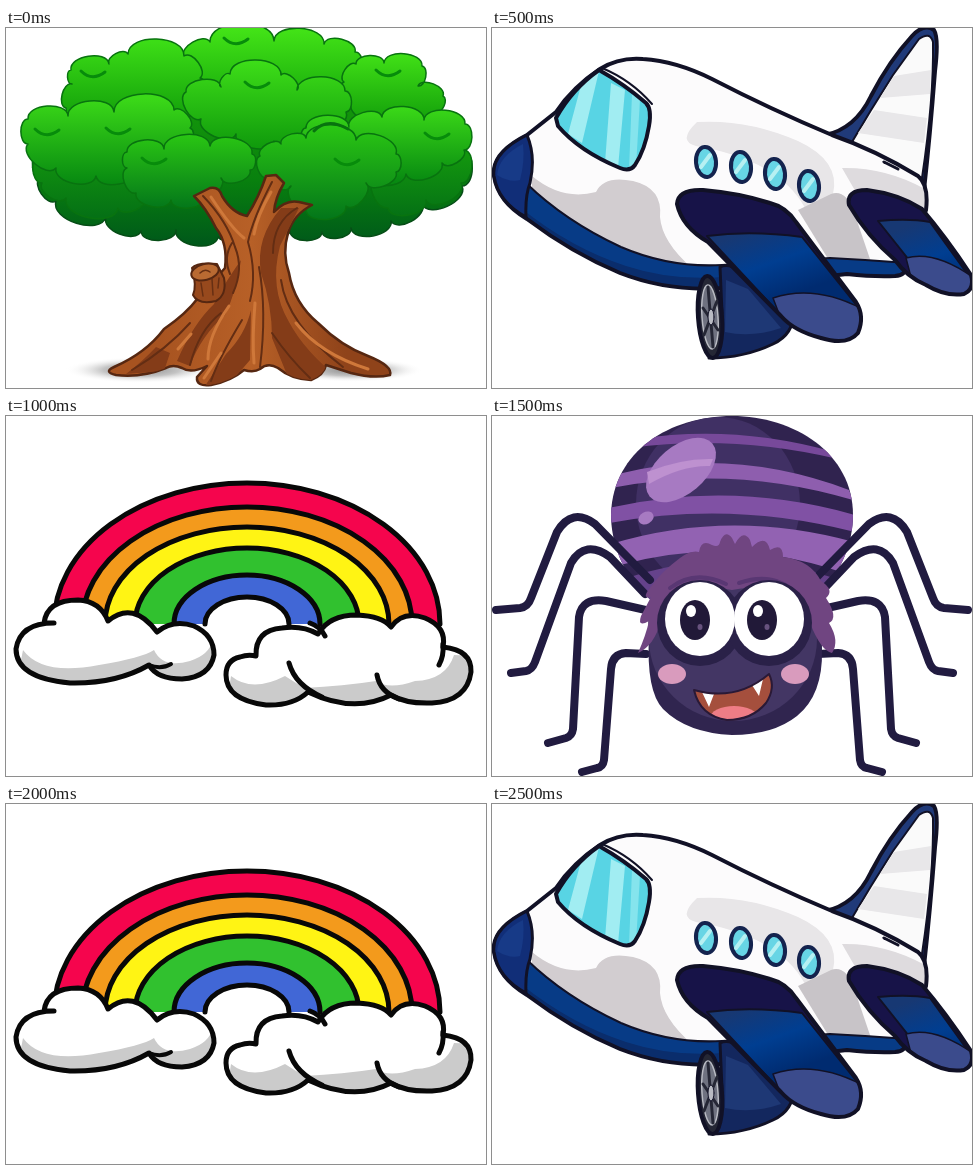
Animation, 480 px wide and 360 px high, one loop 3000 ms. Source, as an HTML page with a canvas:

```html
<!DOCTYPE html>
<html lang="en">
<head>
<meta charset="utf-8">
<title>Tree, plane, rainbow, spider</title>
<style>
html, body { margin: 0; width: 100%; height: 100%; overflow: hidden; background: #fff; }
canvas { display: block; width: 480px; height: 360px; }
</style>
</head>
<body>
<canvas id="stage" width="480" height="360"></canvas>
<script>
const ctx = document.getElementById('stage').getContext('2d');
ctx.lineCap = ctx.lineJoin = 'round';

function paint(path, fill, stroke, width = 3) {
  if (fill) { ctx.fillStyle = fill; ctx.fill(path); }
  if (stroke) { ctx.strokeStyle = stroke; ctx.lineWidth = width; ctx.stroke(path); }
}

const shape = (d, fill, stroke, width) => paint(new Path2D(d), fill, stroke, width);

function oval(x, y, rx, ry, fill, stroke, width, turn = 0) {
  const path = new Path2D();
  path.ellipse(x, y, rx, ry, turn, 0, Math.PI * 2);
  paint(path, fill, stroke, width);
}

function gradient(x0, y0, x1, y1, ...colors) {
  const g = ctx.createLinearGradient(x0, y0, x1, y1);
  colors.forEach((c, i) => g.addColorStop(i / (colors.length - 1), c));
  return g;
}

function clipped(d, draw) {
  ctx.save();
  ctx.clip(new Path2D(d));
  draw();
  ctx.restore();
}

// Closed outline of round puffs between clockwise points.
function puffs(points, fill, stroke, bulge = 0.38) {
  const path = new Path2D();
  path.moveTo(points[0], points[1]);
  for (let i = 0; i < points.length; i += 2) {
    const x = points[i], y = points[i + 1];
    const u = points[(i + 2) % points.length], v = points[(i + 3) % points.length];
    const nx = (v - y) * bulge, ny = (x - u) * bulge;
    path.bezierCurveTo(x + nx, y + ny, u + nx, v + ny, u, v);
  }
  paint(path, fill, stroke, 1.5);
}

function groundShadow(x, y, rx, ry) {
  ctx.save();
  ctx.translate(x, y);
  ctx.scale(rx, ry);
  const g = ctx.createRadialGradient(0, 0, 0, 0, 0, 1);
  g.addColorStop(0, '#8a8a8a');
  g.addColorStop(0.5, '#c4c4c4');
  g.addColorStop(1, '#ffffff00');
  oval(0, 0, 1, 1, g);
  ctx.restore();
}

function leaves(points, light, dark) {
  const ys = points.filter((_, i) => i % 2);
  const top = Math.min(...ys) - 12, bottom = Math.max(...ys) + 8;
  puffs(points, gradient(0, top, 0, bottom, light, dark), '#08730f');
}

function tree() {
  groundShadow(135, 342, 76, 13);
  groundShadow(345, 342, 72, 12);
  puffs([36,120, 60,108, 240,90, 420,108, 456,122, 456,158, 416,176, 385,193, 345,200, 316,204,
    284,203, 240,190, 212,209, 170,202, 135,203, 100,189, 50,173, 34,150],
    gradient(0, 90, 0, 215, '#12930b', '#08800e', '#00591a'), '#064d16');
  leaves([178,50, 178,29, 204,14, 268,13, 318,16, 349,24, 350,50, 300,66, 240,70, 180,66], '#43e317', '#15a80b');
  leaves([60,80, 66,56, 65,42, 103,36, 122,26, 178,28, 194,50, 190,75, 130,85], '#3cdd16', '#119d0a');
  leaves([338,54, 350,36, 378,35, 416,38, 412,58, 437,68, 430,84, 390,88, 345,75], '#43e317', '#119d0a');
  leaves([35,124, 110,114, 150,140, 140,168, 112,180, 60,170, 36,155], '#17a20c', '#057115');
  leaves([380,120, 458,122, 455,155, 420,172, 382,180], '#17a20c', '#057115');
  leaves([22,116, 22,91, 62,88, 108,84, 168,82, 184,100, 176,122, 132,140, 90,148, 50,140], '#3bd918', '#078911');
  leaves([180,64, 215,59, 224,46, 275,47, 291,62, 339,63, 340,84, 300,99, 268,113, 230,106, 195,91], '#3ddd18', '#0f990c');
  leaves([300,118, 300,100, 343,99, 376,89, 418,92, 459,96, 458,122, 436,135, 400,146, 350,140], '#3cdb18', '#078911');
  leaves([121,140, 121,124, 158,121, 204,118, 246,126, 244,142, 215,150, 200,168, 165,172, 130,165], '#2ac713', '#04771a');
  leaves([254,128, 275,116, 300,110, 350,112, 390,126, 390,144, 360,155, 340,178, 300,182, 285,158, 262,150], '#2ac713', '#04771a');
  const curl = 'q11 11 24 1';
  shape([[218,10], [75,43], [370,42], [29,101], [239,54], [136,130], [419,105], [329,131], [100,100]]
    .map(([x, y]) => `M${x} ${y}${curl}`).join(''), null, '#078c0b', 3);
  shape('M308 103Q321 89 342 101', null, '#08730f', 3);
  trunk();
}

function trunk() {
  const bark = `M188 168L204 160Q213 158 216 168Q226 185 241 188Q253 169 260 148L270 147L278 155Q269 170 268 184
    Q280 171 293 174L306 177Q288 186 282 205Q276 225 283 245Q288 275 312 295Q335 318 362 328Q387 338 384 347
    Q368 351 345 345L320 337Q318 347 305 352Q285 351 272 340Q262 334 254 341Q248 345 238 342Q225 353 205 357
    Q190 359 191 349L201 338Q185 346 176 340Q167 336 160 340Q135 350 110 347Q97 344 108 339Q140 325 158 301
    Q180 286 192 270L219 240Q222 215 210 200Q200 180 188 168Z`;
  shape(bark, gradient(150, 0, 340, 0, '#a75320', '#b76027', '#8f431a'), '#562711', 2.5);
  clipped(bark, () => {
    shape(`M275 180Q249 210 255 245Q266 277 266 310L284 354L335 352Q299 324 283 294Q263 260 274 218L293 180Z
      M235 232Q216 259 208 276Q187 296 171 333L184 338Q195 308 219 287Q231 262 235 232Z
      M245 282Q239 307 220 326L199 358L226 353L244 332Z M150 319Q137 333 120 346L158 343L164 325Z`, '#843c18');
    shape(`M197 168Q221 193 229 219Q238 241 227 265M266 154Q247 190 242 214Q251 245 244 273M291 180Q267 194 267 225
      M253 239Q261 283 254 339M215 285Q193 302 184 337M275 252Q281 296 337 339M184 295Q161 321 126 342
      M236 292Q213 330 205 353M266 305Q283 330 304 350M226 215Q217 229 224 246`, null, '#632d13', 2);
    shape(`M205 169Q226 201 238 210M265 164Q251 188 248 206M249 275Q246 310 248 335M223 278Q202 308 202 331
      M290 295Q314 326 362 341M185 306L172 321M215 325L198 350`, null, '#cf783a', 3);
  });
  shape('M186 240Q191 234 211 236L218 250Q221 267 210 273Q192 277 187 267Q191 258 186 240Z', '#97491d', '#562711', 2);
  oval(199, 244, 14, 8, '#b96a32', '#562711', 2, -0.25);
  shape('M194 245q5 -5 10 -1M195 255l2 13M206 251l1 16M213 250l-1 10', null, '#672f13', 1.5);
}

const INK = '#111126';

function plane() {
  shape('M333 107Q363 101 379 68Q397 33 420 8Q432 -5 442 2Q447 10 443 43Q438 108 432 162L360 133Z', '#203a79', INK, 4);
  shape('M357 119Q378 83 401 47L427 11Q438 3 441 14Q442 70 430 150Z', '#fafafa', INK, 2);
  shape('M402 48L439 42L438 66L388 70ZM382 82L435 90L432 115L366 105Z', '#e8e7e9');

  const body = `M2 148Q-1 125 35 107L64 84Q81 59 108 41Q127 29 151 31Q184 33 220 51Q278 81 340 107Q383 122 426 148
    Q437 157 434 182L412 239Q415 247 403 248Q382 249 355 246L230 260Q177 264 128 245Q80 225 35 191Q6 174 2 148Z`;
  shape(body, '#fcfbfc');
  clipped(body, () => {
    shape('M40 148Q70 173 104 164Q112 147 141 153Q171 160 168 189Q170 214 200 240Q131 226 40 176Z', '#d2cdd0');
    shape('M205 94Q256 91 306 113Q349 133 341 166L313 180Q287 132 204 118Q185 113 205 94Z', '#e8e6e8');
    shape('M306 182L339 166Q354 161 362 184L379 234H338Z', '#c8c4c8');
    shape('M350 140Q393 139 433 161L433 183L365 166Z', '#dedbde');
    shape('M34 155Q73 193 129 219Q178 240 230 237L338 230Q378 232 416 235V252H330L220 268Q112 255 24 190Z', '#073b86', INK, 2);
    shape('M30 181Q79 220 134 238Q180 253 230 249V270H100L25 205Z', '#0a2d6c');
  });
  shape(body, null, INK, 4);
  shape('M2 148Q-1 125 35 107Q44 128 38 155Q33 168 34 189Q6 174 2 148Z', '#112e78', INK, 3);
  shape('M5 147Q7 128 31 116Q33 133 28 152Q18 155 5 147Z', '#173a87');
  shape('M392 134L406 141', null, INK, 3);

  const glass = 'M64 90Q80 61 107 42Q132 56 154 75Q160 81 157 98Q153 122 143 137Q138 144 128 140Q87 123 66 98Z';
  shape(glass, '#58d4e4');
  clipped(glass, () => {
    shape('M91 50L107 43L90 115L76 106ZM119 55L133 62L126 140L113 135Z', '#a1edf2');
    shape('M140 66L148 71L144 139L137 142Z', '#85e4ed');
  });
  shape(glass, null, INK, 4);
  shape('M110 40Q139 52 160 76', null, INK, 2);
  for (const [x, y] of [[214,134], [249,139], [283,146], [317,158]]) {
    oval(x, y, 10, 15, '#67d5e5', '#14234e', 4, -0.1);
    shape(`M${x - 5} ${y + 5}L${x + 4} ${y - 7}`, null, '#b6f0f2', 4);
  }

  shape('M228 239Q242 232 262 258L301 285Q302 306 281 316Q252 330 217 330L230 285Z', '#13275e', INK, 3);
  shape('M234 252L256 261L289 300Q260 310 233 304Z', '#1e3875');
  oval(218, 289, 12, 41, '#252735', INK, 4, -0.07);
  oval(218, 289, 8, 32, '#6f7280', '#b9bbc3', 1.5, -0.07);
  shape('M216 259L221 319M211 280L226 302M225 273L212 307', null, '#252735', 3);
  oval(219, 289, 3, 8, '#b9bbc3', INK, 1);

  wing(`M185 176Q186 161 211 162Q247 165 278 175Q294 179 304 194L364 274Q373 288 366 305Q355 318 329 310
    Q302 303 289 288L216 214Q190 199 185 176Z`,
    'M215 208Q259 202 310 209L366 279V310H310Z', 'M281 270Q324 256 372 282V320H300Z', 280);
  wing(`M357 177Q354 162 375 162Q407 166 430 181Q454 209 479 247Q483 261 472 266Q454 269 434 257
    Q415 249 403 232Q375 208 357 177Z`,
    'M386 193Q417 190 438 194L479 251L448 271Z', 'M414 230Q443 222 482 250V280H427Z', 425);
}

function wing(outline, panel, tip, x) {
  shape(outline, '#171348');
  clipped(outline, () => {
    shape(panel, gradient(x, 195, x + 25, 265, '#173873', '#003e91', '#002b70'), INK, 2);
    shape(tip, '#3b4b8c', INK, 1.5);
  });
  shape(outline, null, INK, 4);
}

function rainbow() {
  const bands = [[193,141,'#f5054d'], [165,117,'#f39a1c'], [142,97,'#fff414'],
    [112,76,'#31c12f'], [73,49,'#4167d6'], [42,27,'#fff']];
  for (const [rx, ry, color] of bands) {
    const arch = new Path2D();
    arch.ellipse(241, 208, rx, ry, 0, Math.PI, Math.PI * 2);
    paint(arch, color, '#080808', 5);
  }
  cloud(`M48 207L38 207Q41 184 72 184Q94 185 102 205Q127 184 151 216Q167 203 188 210Q208 219 208 239
    Q204 261 176 263Q151 263 143 249Q110 268 64 267Q10 262 10 233Q14 207 48 207Z`,
    'M17 234Q36 260 93 249Q136 242 148 234Q157 253 184 245Q203 239 207 224V270H10Z');
  shape('M143 249Q155 254 165 248', null, '#080808', 4);
  cloud(`M234 241Q242 238 250 240Q249 214 276 212Q296 209 312 218Q323 199 351 199Q376 200 385 211
    Q397 194 419 202Q441 211 437 231Q466 234 465 256Q461 285 426 287Q400 288 385 279Q348 298 302 276
    Q287 290 260 289Q220 284 220 259Q220 244 234 241Z`,
    `M225 260Q246 277 279 260L298 272Q338 270 370 265Q383 274 409 265Q440 264 448 239L470 240V294H220Z`);
  shape('M283 247Q289 269 316 281M371 259Q374 276 393 283M437 228Q438 240 433 249M304 207Q315 211 319 220',
    null, '#080808', 5);
}

function cloud(outline, shade) {
  shape(outline, '#fff');
  clipped(outline, () => shape(shade, '#cbcbcb'));
  shape(outline, null, '#080808', 5);
}

function legs() {
  shape(`M158 164L103 108Q80 91 65 116L39 182Q36 191 28 192L4 194
    M153 178L118 141Q93 123 79 147L43 246Q40 254 34 255L19 257
    M158 195L114 185Q90 181 87 201L81 313Q80 320 74 322L56 327
    M154 238L134 237Q120 238 119 253L112 344Q111 351 105 352L90 356`, null, '#211b40', 8);
}

function spider() {
  const abdomen = 'M119 98C121 35 178 0 240 0C302 0 361 37 361 99C361 154 316 212 240 212C165 212 119 157 119 98Z';
  shape(abdomen, '#30234f');
  clipped(abdomen, () => {
    oval(226, 88, 82, 87, '#403064');
    shape('M145 23Q240 8 339 35L346 43Q240 18 138 32Z', '#77499a');
    shape('M126 58Q240 30 357 74L361 84Q240 48 119 72Z', '#8e5eae');
    shape('M117 92Q240 64 363 99V116Q240 84 117 107Z', '#8051a4');
    shape('M119 128Q238 92 362 126L349 156Q240 119 128 149Z', '#9262b2');
    shape('M129 164Q241 125 350 165L325 210H158Z', '#65428b');
  });
  oval(189, 54, 41, 24, '#a77ac2', null, 0, -0.7);
  shape('M155 56Q190 42 221 43L218 50Q190 49 157 68Z', '#be91d0');
  oval(154, 102, 8, 6, '#a77ac2', null, 0, -0.5);

  legs();
  ctx.save();
  ctx.translate(480, 0);
  ctx.scale(-1, 1);
  legs();
  ctx.restore();

  const head = 'M157 219Q151 166 195 153Q241 137 287 153Q331 172 330 234Q331 279 305 300Q281 319 240 319Q195 317 171 293Q154 275 157 219Z';
  shape(head, '#30254f');
  clipped(head, () => oval(241, 223, 84, 82, '#433664'));
  shape(`M146 237Q154 219 157 205Q145 212 149 200L159 181Q149 183 158 172Q169 156 188 142Q199 134 207 136
    Q209 123 220 129Q227 132 228 126Q233 113 240 122L243 128Q251 113 258 124L260 131Q274 117 278 134
    Q291 126 291 141Q318 144 329 165Q343 174 334 182Q347 202 337 207Q348 225 340 237Q329 235 318 207
    Q289 164 240 174Q191 162 169 205Q162 230 146 237Z`, '#704581');
  shape('M178 172Q203 153 234 168M247 167Q282 155 305 178', null, '#593773', 4);

  for (const x of [208, 277]) oval(x, 207, 43, 43, '#2a2148');
  for (const x of [208, 277]) oval(x, 203, 35, 37, '#fff');
  for (const x of [203, 270]) {
    oval(x, 204, 15, 20, '#211938');
    oval(x - 4, 195, 5, 6, '#fff');
    oval(x + 5, 211, 2.5, 3, '#67527e');
  }
  for (const x of [180, 303]) oval(x, 258, 14, 10, '#d99bbd');

  const mouth = 'M202 274Q244 286 277 258Q284 272 274 287Q260 304 235 304Q208 300 202 274Z';
  shape(mouth, '#a54f3d');
  clipped(mouth, () => {
    oval(242, 302, 24, 12, '#ef7d86');
    shape('M210 276L222 278L217 291ZM260 269L271 263L267 280Z', '#fff');
  });
  shape(mouth, null, '#2a1936', 2);
}

const scenes = [tree, plane, rainbow, spider, rainbow, plane];
let shown = -1;

function frame() {
  const index = Math.floor(performance.now() / 500) % scenes.length;
  if (index !== shown) {
    shown = index;
    ctx.fillStyle = '#fff';
    ctx.fillRect(0, 0, 480, 360);
    scenes[index]();
  }
  requestAnimationFrame(frame);
}
frame();
</script>
</body>
</html>
```
